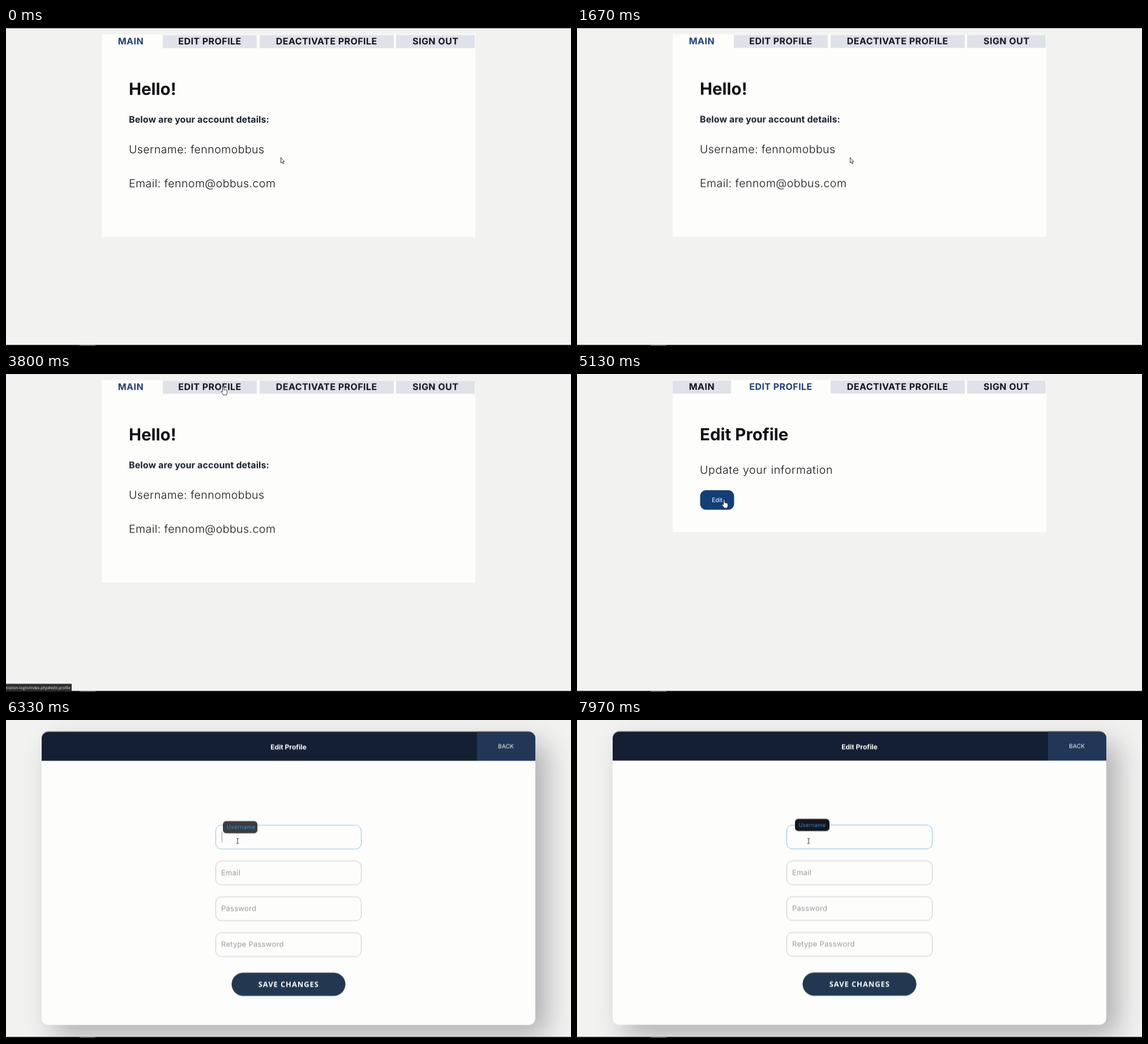
An HTML page for the animation above (8000 ms loop, 998x561 px).

```html
<!DOCTYPE html>
<html lang="en">
<head>
<meta charset="utf-8">
<title>Profile page</title>
<style>
  html, body { margin: 0; width: 100%; height: 100%; overflow: hidden; background: #f2f2f1; }
  svg { display: block; width: 100%; height: 100%; font-family: Inter, sans-serif; text-rendering: geometricPrecision; }

  /* Every animation shares one 8 s loop; 1% is 80 ms. */
  .loop { animation: 8s linear infinite; }
  .cut { animation: 8s step-end infinite; }

  /* Account pages */
  .panel { fill: #fdfdfc; }
  .tab { fill: #dfe2e8; }
  .tabs text { font-size: 16px; font-weight: 700; letter-spacing: .45px; text-anchor: middle; fill: #111318; }
  .tabs .on { fill: #1d4077; }
  .title { font-size: 29.5px; font-weight: 700; fill: #101014; }
  .lead { font-size: 16px; font-weight: 700; letter-spacing: .1px; fill: #17222f; }
  .line { font-size: 19.5px; font-weight: 350; letter-spacing: .7px; fill: #111114; }
  .detail { letter-spacing: .45px; }

  /* Form */
  .card { filter: drop-shadow(20px 20px 24px rgba(20, 20, 30, .3)); }
  .center { text-anchor: middle; }
  .field { fill: none; stroke: #c6c8cd; }
  .hint { font-size: 13px; letter-spacing: .25px; fill: #9a9a9c; }
  .save { font: 700 13px "Open Sans", sans-serif; letter-spacing: .9px; fill: #fff; }

  /* Cursors */
  .pointer { fill: #fff; stroke: #222; stroke-width: .9; stroke-linejoin: round; }

  #drift { animation-name: drift; }
  #main { animation-name: main; }
  #edit { animation-name: edit; }
  #account { animation-name: account; }
  #form { animation-name: form; }
  #status { animation-name: status; }
  #cursor { animation-name: travel; }
  #arrow { animation-name: arrow; }
  #hand { animation-name: hand; }
  #beam { animation-name: beam; }
  #caret { animation-name: caret; }
  #focus { animation-name: focus; }
  #label { animation-name: lift; }
  #label rect { animation-name: darken; }
  #label text { animation-name: shrink; transform-origin: 391.5px 189px; font-size: 9.5px; letter-spacing: .2px; }

  @keyframes drift { to { transform: translateY(-1.6px); } }
  @keyframes main { 0% { visibility: visible; } 52%, 100% { visibility: hidden; } }
  @keyframes edit { 0% { visibility: hidden; } 52%, 100% { visibility: visible; } }
  @keyframes account { 0% { opacity: 1; } 68.75%, 100% { opacity: 0; } }
  @keyframes form { 0% { opacity: 0; } 68.75%, 100% { opacity: 1; } }
  @keyframes status { 0% { opacity: 0; } 43.5% { opacity: 1; } 54.5%, 100% { opacity: 0; } }

  @keyframes travel {
    0%, 17% { transform: translate(485px, 228px); }
    20%, 28.75% { transform: translate(482px, 228px); animation-timing-function: ease-in; }
    37.125% { transform: translate(451.5px, 79px); animation-timing-function: ease-out; }
    43.75%, 53.2% { transform: translate(384px, 22.5px); animation-timing-function: ease-in-out; }
    62%, 68.75% { transform: translate(260px, 222px); animation-timing-function: ease-in-out; }
    75.5%, 100% { transform: translate(409px, 213.5px); }
  }
  @keyframes arrow {
    0% { opacity: 1; } 42.5% { opacity: 0; } 54.5% { opacity: 1; }
    60.5% { opacity: 0; } 68.75% { opacity: 1; } 74%, 100% { opacity: 0; }
  }
  @keyframes hand {
    0% { opacity: 0; } 42.5% { opacity: 1; } 54.5% { opacity: 0; }
    60.5% { opacity: 1; } 68.75%, 100% { opacity: 0; }
  }
  @keyframes beam { 0% { opacity: 0; } 74%, 100% { opacity: 1; } }

  @keyframes caret {
    0% { opacity: 0; } 77.125% { opacity: 1; } 83.375% { opacity: 0; }
    89.625% { opacity: 1; } 95.875%, 100% { opacity: 0; }
  }
  @keyframes focus {
    0%, 77.125% { stroke: #c6c8cd; animation-timing-function: ease; }
    80.875%, 100% { stroke: #7fc3ea; }
  }
  @keyframes lift {
    0%, 77.125% { transform: translate(-11.5px, 22px); animation-timing-function: ease; }
    80.875%, 100% { transform: none; }
  }
  @keyframes darken {
    0%, 77.125% { fill: rgba(21, 23, 28, 0); animation-timing-function: ease; }
    80.875%, 100% { fill: rgba(21, 23, 28, 1); }
  }
  @keyframes shrink {
    0%, 77.125% { transform: scale(1.38); fill: #9a9a9c; animation-timing-function: ease; }
    80.875%, 100% { transform: scale(1); fill: #2f8ddc; }
  }
</style>
</head>
<body>
<svg viewBox="0 0 998 561" preserveAspectRatio="none">
  <rect width="998" height="561" fill="#f2f2f1"/>

  <g id="drift" class="loop">
    <g id="account" class="cut">
      <rect width="998" height="1" fill="#85858e"/>

      <g id="main" class="cut">
        <path class="panel" d="M169 11.5H829V368.5H169z"/>
        <path class="tab" d="M277 12.5H443V35.5H277z"/>
        <g class="tabs">
          <text class="on" x="220.4" y="29.3">MAIN</text>
          <text x="360" y="29.3">EDIT PROFILE</text>
        </g>
        <text class="title" x="217" y="118">Hello!</text>
        <text class="lead" x="217" y="167">Below are your account details:</text>
        <text class="line detail" x="217" y="221.5">Username: fennomobbus</text>
        <text class="line detail" x="217" y="281">Email: fennom@obbus.com</text>
      </g>

      <g id="edit" class="cut">
        <path class="panel" d="M169 11.5H829V280H169z"/>
        <path class="tab" d="M169 12.5H272V35.5H169z"/>
        <g class="tabs">
          <text x="220.4" y="29.3">MAIN</text>
          <text class="on" x="360" y="29.3">EDIT PROFILE</text>
        </g>
        <text class="title" x="217" y="118">Edit Profile</text>
        <text class="line" x="217" y="177">Update your information</text>
        <rect x="217.5" y="206" width="60" height="34.5" rx="10" fill="#123f78"/>
        <text class="center" x="247.5" y="227" font-size="10.5" fill="#fff">Edit</text>
      </g>

      <path class="tab" d="M448 12.5H685V35.5H448zM689 12.5H828V35.5H689z"/>
      <g class="tabs">
        <text x="566.2" y="29.3">DEACTIVATE PROFILE</text>
        <text x="758.7" y="29.3">SIGN OUT</text>
      </g>
    </g>

    <g id="form" class="cut">
      <g transform="translate(0 1.25)">
        <rect class="card" x="63" y="20.5" width="872" height="517.5" rx="12" fill="#fdfdfc"/>
        <path d="M63 72V32.5a12 12 0 0 1 12-12H923a12 12 0 0 1 12 12V72z" fill="#141f33"/>
        <path d="M832 72V20.5H923a12 12 0 0 1 12 12V72z" fill="#223657"/>
        <text class="center" x="499" y="52" font-size="12" font-weight="700" fill="#fff">Edit Profile</text>
        <text class="center" x="883" y="49.8" font-size="10.3" fill="#f4f6fa">BACK</text>

        <rect id="focus" class="field loop" x="370.5" y="185.7" width="257" height="42" rx="10"/>
        <rect class="field" x="370.5" y="248.8" width="257" height="42" rx="10"/>
        <rect class="field" x="370.5" y="312" width="257" height="42" rx="10"/>
        <rect class="field" x="370.5" y="375.2" width="257" height="42" rx="10"/>
        <text class="hint" x="380" y="274.3">Email</text>
        <text class="hint" x="380" y="337.3">Password</text>
        <text class="hint" x="380" y="400.4">Retype Password</text>

        <g id="label" class="loop">
          <rect class="loop" x="385" y="174.7" width="61" height="21.5" rx="6"/>
          <text class="loop" x="391.5" y="189">Username</text>
        </g>
        <path id="caret" class="cut" d="M381.5 197.5V216" stroke="#a98c92"/>

        <rect x="398.5" y="445.7" width="201" height="41" rx="20.5" fill="#213850"/>
        <text class="save center" x="499.3" y="470.8">SAVE CHANGES</text>
      </g>
    </g>
  </g>

  <g id="status" class="cut">
    <path d="M0 546.5H116V559H0z" fill="#2f2f31"/>
    <text x="0" y="555.5" fill="#e8e8e8" style="font: 6.9px 'Open Sans', sans-serif">tration-login/index.php#edit-profile</text>
  </g>
  <path d="M0 559H998V561H0z" fill="#1d171b"/>
  <path d="M130 559H158V561H130z" fill="#51494f"/>

  <g id="cursor" class="loop">
    <path id="arrow" class="cut pointer" d="M.5 .5V10.2L2.6 8.3 4.1 11.5 5.5 10.9 4.1 7.8H6.6z"/>
    <path id="hand" class="cut pointer" d="M-1.2 8.5V.8a1.1 1.1 0 0 1 2.2 0V5l4 .8q1.5 .4 1.5 2V10.5q0 1.5-1 2.8V14.5H-.7V13.3L-3.7 9.3q-.8-1.5 .6-1.6z"/>
    <path id="beam" class="cut" d="M-2-4.5H-.7L0-4 .7-4.5H2M0-4V4M-2 4.5H-.7L0 4 .7 4.5H2" fill="none" stroke="#333"/>
  </g>
</svg>
</body>
</html>
```
